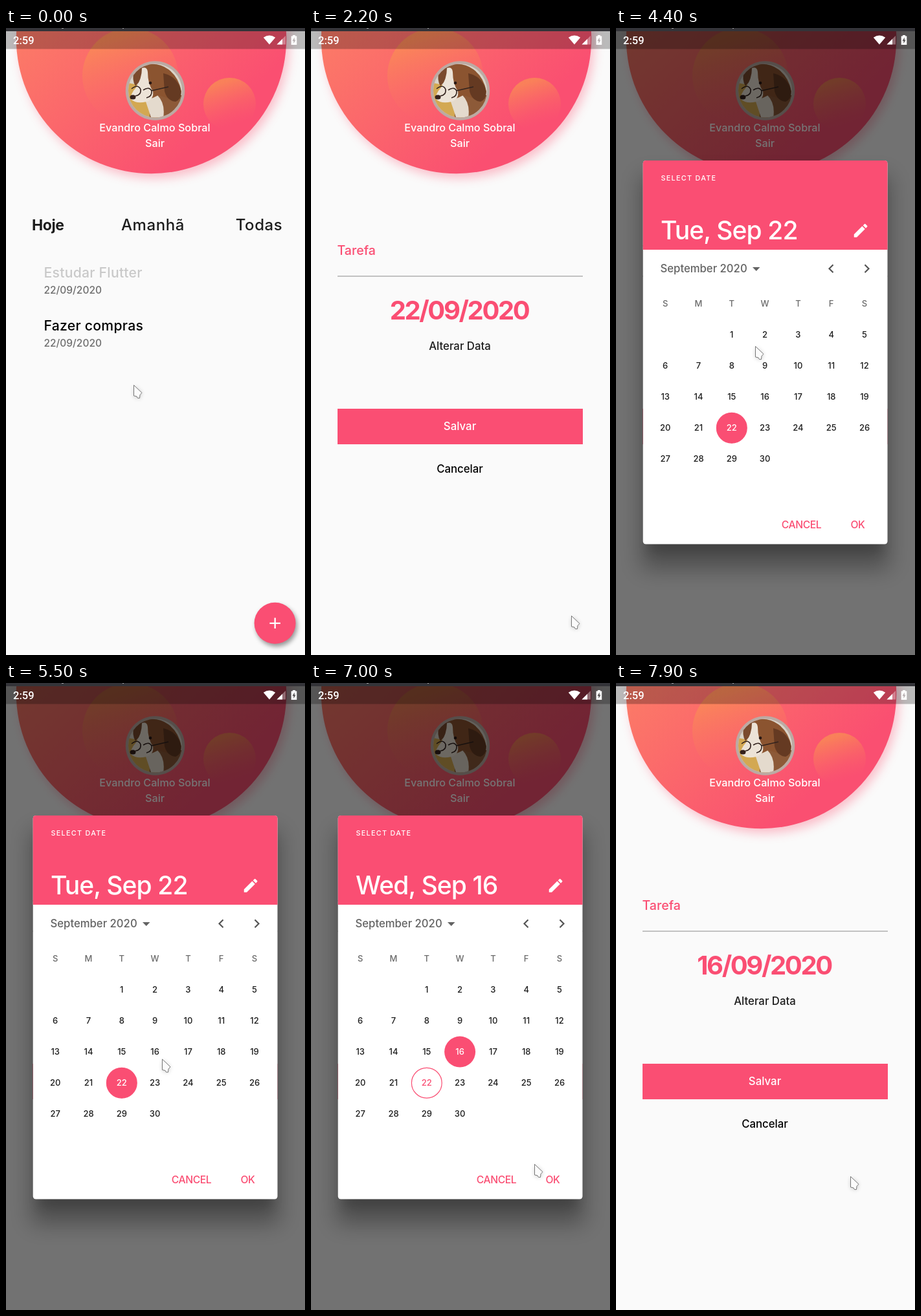
Animation of 462 by 970 pixels, one loop 8000 ms. Source, as an HTML page:

```html
<!DOCTYPE html>
<html lang="pt-BR">
<head>
<meta charset="utf-8">
<title>Tarefas</title>
<style>
  html, body { margin: 0; width: 100%; height: 100%; overflow: hidden; background: #fafafa; }
  svg { display: block; width: 462px; height: 970px; }
  text { font-family: Inter, "Open Sans", sans-serif; font-weight: 500; }
  .mid { text-anchor: middle; }
  .pink { fill: #fa4e73; }
  .white { fill: #fff; }
  .btn { font-size: 16.8px; }
  .tab { font-size: 24px; letter-spacing: .6px; fill: #1d1d1d; }
  .tab.on { font-size: 23px; font-weight: 700; letter-spacing: -.4px; }
  .task { font-size: 21.2px; letter-spacing: .25px; }
  .date { font-size: 15.5px; fill: #6f6f6f; }
  .due { font-size: 40px; font-weight: 700; letter-spacing: -2.4px; }
  .title { font-size: 39px; letter-spacing: -.9px; }
  .day { font-size: 13px; fill: #1c1c1c; }
  .week { font-size: 13px; fill: #6a6a6a; }
  .action { font-size: 15.7px; letter-spacing: -.4px; }
</style>
</head>
<body>
<svg viewBox="0 0 462 970">
  <defs>
    <linearGradient id="sun" x1="0" y1=".42" x2=".55" y2="1">
      <stop offset="0" stop-color="#fc7e66"/><stop offset="1" stop-color="#fa4f71"/>
    </linearGradient>
    <linearGradient id="glow" x1=".3" y1="0" x2=".6" y2="1">
      <stop offset=".1" stop-color="#f99350" stop-opacity=".7"/><stop offset=".9" stop-color="#fb6a68" stop-opacity="0"/>
    </linearGradient>
    <filter id="soft" x="-30%" y="-30%" width="160%" height="160%"><feGaussianBlur stdDeviation="8"/></filter>
    <filter id="wide" x="-30%" y="-30%" width="160%" height="160%"><feGaussianBlur stdDeviation="17"/></filter>
    <filter id="near" x="-50%" y="-50%" width="200%" height="200%"><feGaussianBlur stdDeviation="3.5"/></filter>
    <clipPath id="screen"><rect y="5" width="462" height="965"/></clipPath>
    <clipPath id="face"><circle cx="230.5" cy="97" r="41.5"/></clipPath>
  </defs>

  <rect width="462" height="970" fill="#fafafa"/>

  <g clip-path="url(#screen)">
    <circle cx="229.5" cy="24.5" r="208" fill="#fb6480" opacity=".4" filter="url(#soft)"/>
    <circle cx="224.5" cy="16.5" r="208.7" fill="url(#sun)"/>
    <circle cx="192" cy="74" r="74" fill="url(#glow)"/>
    <circle cx="345.5" cy="117.5" r="40.5" fill="url(#glow)"/>

    <circle cx="230.5" cy="97" r="45.7" fill="#bcaaa3"/>
    <g clip-path="url(#face)">
      <rect x="184" y="50" width="94" height="94" fill="#d9d3c8"/>
      <path d="M184 84l30 6 24 54h-54z" fill="#d3a852"/>
      <path d="M222 144q-2-30 14-42l40 2v40z" fill="#8d5a38"/>
      <path d="M214 108l20-4q14 14 8 40h-16z" fill="#e4dacd"/>
      <path d="M207 60q24-10 44 4q16 12 20 34q-2 16-16 12l-20-6q-16 10-28 2z" fill="#8b5430"/>
      <path d="M198 64q10-8 16-4q-2 18-14 30q-6-10-2-26z" fill="#7a4a2d"/>
      <path d="M210 62q8-3 9 6q0 18 8 30q2 12-10 16q-16 4-24-4q-1-8 8-18q9-14 9-30z" fill="#ece3d7"/>
      <path d="M243 70q19 4 26 22q5 17-7 22q-13-1-17-16z" fill="#653a22"/>
      <ellipse cx="196" cy="107" rx="4.5" ry="3.6" fill="#35211c"/>
      <path d="M194 94q10-8 14 1q1 9-8 10M212 96q9-6 13 1q1 9-8 11M225 97l26-6" fill="none" stroke="#33231e" stroke-width="1.6"/>
      <circle cx="223" cy="85" r="2.3" fill="#2a1914"/>
    </g>
    <g class="mid white" font-size="16.2">
      <text x="230" y="159.5">Evandro Calmo Sobral</text>
      <text x="230" y="184">Sair</text>
    </g>

    <g id="list">
      <text x="40" y="312.5" class="tab on">Hoje</text>
      <text x="227" y="312.5" class="tab mid">Amanhã</text>
      <text x="391" y="312.5" class="tab mid">Todas</text>
      <text x="58.5" y="385.5" class="task" fill="#c9c9c9">Estudar Flutter</text>
      <text x="58.5" y="410.5" class="date">22/09/2020</text>
      <text x="58.5" y="468" class="task">Fazer compras</text>
      <text x="58.5" y="493" class="date">22/09/2020</text>
      <circle id="lift" cx="418" cy="925" r="32" filter="url(#near)" opacity=".4"/>
      <circle cx="415.6" cy="920.8" r="32" class="pink"/>
      <circle id="ripple" cx="415.6" cy="920.8" r="0" class="white" opacity=".16"/>
      <path d="M407.4 920.8h16.6M415.7 912.5v16.6" stroke="#fff" stroke-width="2.3"/>
    </g>

    <g id="form">
      <text x="40.5" y="350.5" class="pink" font-size="19.6">Tarefa</text>
      <path d="M41 384h379" stroke="#8b8b8b" stroke-width="1.2"/>
      <text id="due" x="229" y="450.5" class="mid pink due"></text>
      <text x="230" y="498" class="mid btn" fill="#1d1d1d">Alterar Data</text>
      <rect x="41" y="589" width="379" height="55" class="pink"/>
      <text x="230" y="622" class="mid btn white">Salvar</text>
      <text x="230" y="688" class="mid btn">Cancelar</text>
    </g>

    <g id="dialog">
      <rect width="462" height="970" opacity=".54"/>
      <rect x="40" y="230" width="382" height="606" opacity=".32" filter="url(#wide)"/>
      <rect x="50" y="230" width="362" height="580" opacity=".14" filter="url(#soft)"/>
      <rect x="41.7" y="205" width="377.8" height="593.5" rx="4.5" class="white"/>
      <path d="M41.7 343V209.5q0-4.5 4.5-4.5h368.8q4.5 0 4.5 4.5V343z" class="pink"/>
      <text x="69.5" y="236" class="white" style="font-size:10.8px;letter-spacing:1.3px">SELECT DATE</text>
      <text id="pick" x="69" y="327" class="title white"></text>
      <path transform="translate(364.3 299.5) scale(1.15)" class="white" d="M3 17.25V21h3.75L17.81 9.94l-3.75-3.75zM20.71 7.04a1 1 0 0 0 0-1.41l-2.34-2.34a1 1 0 0 0-1.41 0l-1.83 1.83 3.75 3.75z"/>
      <text x="68.5" y="378" font-size="16.7" fill="#636363">September 2020</text>
      <path d="M211 370h11.5l-5.75 6z" fill="#636363"/>
      <path d="M335.5 366.2l-6 6 6 6M384.5 366.2l6 6-6 6" fill="none" stroke="#555" stroke-width="2.2"/>
      <g id="days" class="mid"></g>
      <rect id="press" x="348" y="750" width="52" height="36" rx="4" class="pink" opacity=".08"/>
      <text x="286.5" y="774" class="mid action pink">CANCEL</text>
      <text x="373.5" y="774" class="mid action pink">OK</text>
    </g>

    <rect y="5" width="462" height="27.5" opacity=".26"/>
    <g class="white">
      <text x="11" y="25" style="font:500 16.5px Roboto,sans-serif">2:59</text>
      <path d="M407 25.5l-9.2-10.8q9.2-6.6 18.4 0z"/>
      <path d="M418.5 25.5l13.5-13.5v13.5z" opacity=".35"/>
      <path d="M418.5 25.5l8.5-8.5v8.5z"/>
      <path fill-rule="evenodd" d="M443 11h4v1.6h2.3v13.4h-8.6v-13.4h2.3zM445.8 14.5l-3.3 5.6h1.9v4l3.3-5.6h-1.9z"/>
    </g>
  </g>

  <rect width="462" height="5" fill="#343439"/>
  <path d="M86 0h3M180 0h2" stroke="#c8c8c8" stroke-width="1.6"/>

  <g id="cursor">
    <path d="M1 2V18.5l4.3.4 1.6 2.4h2.6l.5-5 3-3z" opacity=".22" filter="url(#near)"/>
    <path d="M.5.5V17l4.5 1 1.5 2.6h3l.5-5 3-3.2z" fill="#fbfbfb" stroke="#777" stroke-linejoin="round"/>
  </g>
</svg>

<script>
  const LOOP = 8000, STEP = 100;
  const $ = id => document.getElementById(id);

  // [first step, last step, x, y]
  const moves = [
    [800, 1400, 402, 909],
    [2400, 2600, 271, 616],
    [3100, 3200, 212, 487],
    [3300, 3300, 215, 492],
    [4800, 5100, 258, 600],
    [5300, 5800, 224, 563],
    [6100, 6100, 268, 612],
    [6500, 6500, 278, 621],
    [6600, 7000, 345, 744],
    [7400, 7400, 362, 763]
  ];

  const add = (tag, attrs, label = '') => {
    const el = document.createElementNS('http://www.w3.org/2000/svg', tag);
    for (const key in attrs) el.setAttribute(key, attrs[key]);
    el.textContent = label;
    return $('days').appendChild(el);
  };

  // September 2020 begins on a Tuesday
  const slot = day => day + 1;
  const col = i => 76.2 + 51.3 * (i % 7);
  const row = i => 474 + 48.15 * Math.floor(i / 7);
  const disc = (day, attrs) =>
    add('circle', { cx: col(slot(day)), cy: row(slot(day)) + .3, fill: '#fa4e73', ...attrs });

  const today = disc(22, { r: 23.4, stroke: '#fa4e73', 'stroke-width': 1.2 });
  const chosen = disc(16, { r: 24 });
  [...'SMTWTFS'].forEach((d, i) => add('text', { x: col(i), y: 430.7, class: 'week' }, d));
  const days = Array.from({ length: 30 }, (_, i) =>
    add('text', { x: col(slot(i + 1)), y: row(slot(i + 1)) + 4.8, class: 'day' }, i + 1));

  const show = (el, on) => { el.style.display = on ? '' : 'none'; };
  const within = (t, a, b) => t >= a && t < b;

  function cursorAt(t) {
    let x = 197, y = 552;
    for (const [a, b, nx, ny] of moves) {
      if (t < a) break;
      const p = Math.min(1, (t - a + STEP) / (b - a + STEP));
      const e = p * p * (3 - 2 * p);
      x += (nx - x) * e;
      y += (ny - y) * e;
    }
    return `translate(${x.toFixed(1)} ${y.toFixed(1)})`;
  }

  function draw(t) {
    const changed = t >= 6000;
    const pressed = within(t, 1700, 2000);

    $('cursor').setAttribute('transform', cursorAt(t));
    show($('list'), t < 2200);
    show($('form'), t >= 2200);
    show($('dialog'), within(t, 4400, 7900));

    $('lift').setAttribute('cy', pressed ? 929 : 925);
    $('ripple').setAttribute('r', pressed ? (t < 1800 ? 16 : 32) : 0);
    show($('press'), within(t, 7600, 7800));

    $('due').textContent = t >= 7900 ? '16/09/2020' : '22/09/2020';
    $('pick').textContent = changed ? 'Wed, Sep 16' : 'Tue, Sep 22';
    show(chosen, changed);
    today.style.fill = changed ? 'none' : '';
    days[15].style.fill = changed ? '#fff' : '';
    days[21].style.fill = changed ? '#fa4e73' : '#fff';
  }

  const start = performance.now();
  function tick() {
    const t = (performance.now() - start) % LOOP;
    draw(Math.floor(t / STEP) * STEP);
    requestAnimationFrame(tick);
  }
  tick();
</script>
</body>
</html>
```
